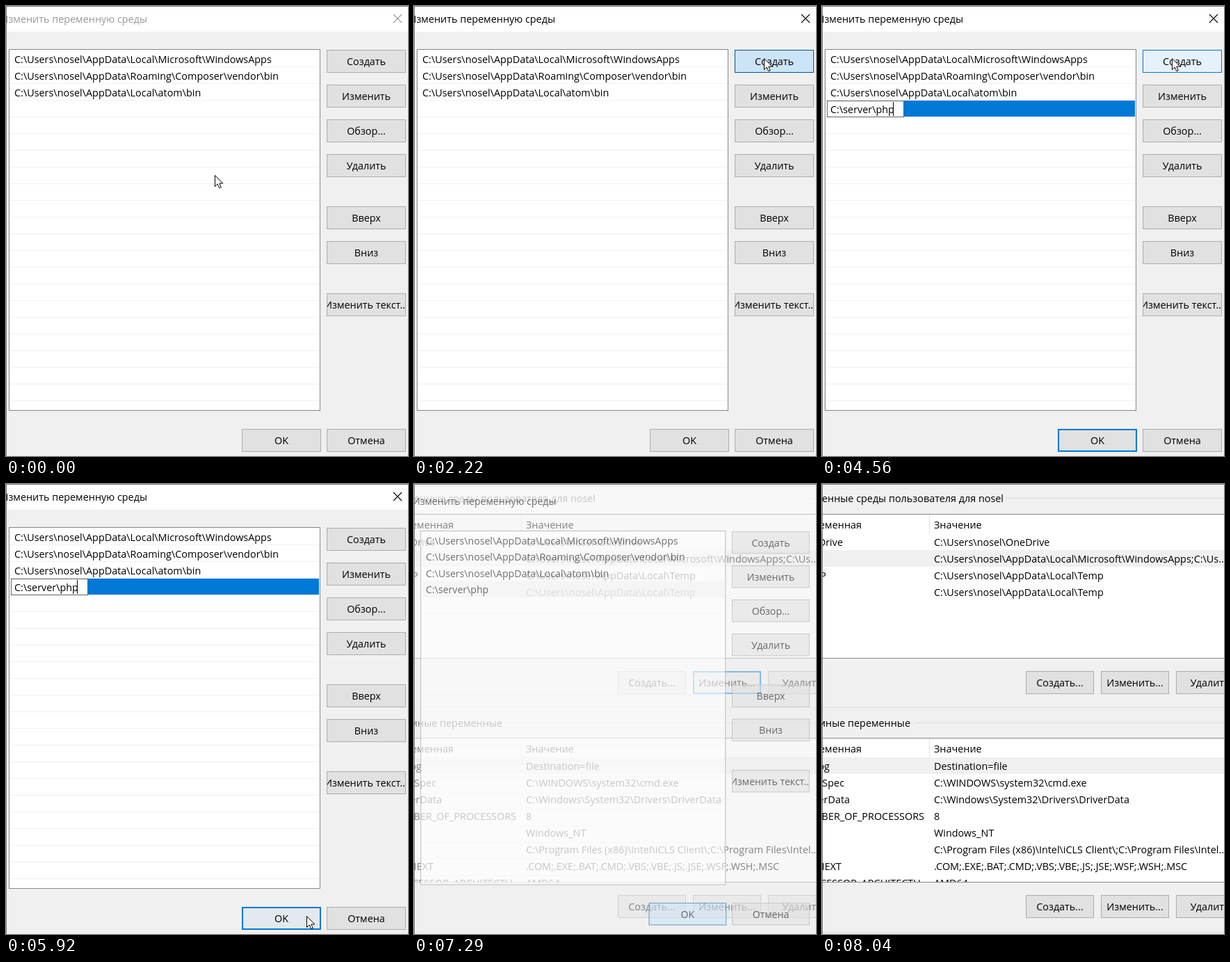
An HTML page with a canvas that plays this animation: 578 by 647 pixels, repeating every 8140 ms.

```html
<!DOCTYPE html>
<html lang="ru">
<head>
<meta charset="utf-8">
<style>
  html, body { margin: 0; width: 100%; height: 100%; overflow: hidden; background: #f0f0f0; }
  canvas { display: block; }
</style>
</head>
<body>
<canvas id="stage" width="578" height="647"></canvas>
<script>
const W = 578, H = 647, LOOP = 8140, STEP = 90;
const ctx = document.getElementById('stage').getContext('2d');
const HOME = 'C:\\Users\\nosel\\';
const PATHS = [
  HOME + 'AppData\\Local\\Microsoft\\WindowsApps',
  HOME + 'AppData\\Roaming\\Composer\\vendor\\bin',
  HOME + 'AppData\\Local\\atom\\bin'
];
const NEW_PATH = 'C:\\server\\php';
const BLUE = [0, 120, 215], GREY = [225, 225, 225], EDGE = [173, 173, 173], HOT = [229, 241, 251];
const CARET_OFF = [[2840, 3310], [4000, 4560], [5110, 5650], [6100, 6560]];
const USER_VARS = [
  ['OneDrive', 30, HOME + 'OneDrive'],
  ['', 0, PATHS[0] + ';C:\\Us...'],
  ['TEMP', 6, HOME + 'AppData\\Local\\Temp'],
  ['', 0, HOME + 'AppData\\Local\\Temp']
];
const SYSTEM_VARS = [
  ['asl.log', 11, 'Destination=file'],
  ['ComSpec', 32, 'C:\\WINDOWS\\system32\\cmd.exe'],
  ['DriverData', 40, 'C:\\Windows\\System32\\Drivers\\DriverData'],
  ['NUMBER_OF_PROCESSORS', 147, '8'],
  ['', 0, 'Windows_NT'],
  ['', 0, 'C:\\Program Files (x86)\\Intel\\iCLS Client\\;C:\\Program Files\\Intel...'],
  ['PATHEXT', 28, '.COM;.EXE;.BAT;.CMD;.VBS;.VBE;.JS;.JSE;.WSF;.WSH;.MSC'],
  ['PROCESSOR_ARCHITECTU...', 153, 'AMD64']
];

// Fraction of a move made of `count` equal steps, the first one at `start`
const progress = (t, start, count) =>
  Math.min(1, Math.max(0, (Math.floor((t - start) / STEP) + 1) / count));
const ease = p => p * p * (3 - 2 * p);
const lerp = (a, b, p) => a + (b - a) * p;
const mix = (a, b, p) => `rgb(${a.map((v, i) => Math.round(lerp(v, b[i], p)))})`;

function rect(x, y, w, h, color) {
  ctx.fillStyle = color;
  ctx.fillRect(x, y, w, h);
}

function frame(x, y, w, h, color, line = 1) {
  ctx.strokeStyle = color;
  ctx.lineWidth = line;
  ctx.strokeRect(x + line / 2, y + line / 2, w - line, h - line);
}

function text(s, x, y, align = 'left', color = '#000') {
  ctx.textAlign = align;
  ctx.fillStyle = color;
  ctx.fillText(s, x, y);
}

function button(label, x, y, w, { hot = 0, pressed = false, focus = false } = {}) {
  rect(x, y, w, 33, pressed ? '#cce4f7' : mix(GREY, HOT, hot));
  const edge = pressed ? '#005499' : mix(focus ? BLUE : EDGE, BLUE, hot);
  frame(x, y, w, 33, edge, focus && !pressed ? 2 : 1);
  ctx.save();
  ctx.beginPath();
  ctx.rect(x + 1, y + 1, w - 2, 31);
  ctx.clip();
  text(label, x + w / 2, y + 22, 'center');
  ctx.restore();
}

function closeCross(color) {
  ctx.strokeStyle = color;
  ctx.lineWidth = 1.1;
  ctx.beginPath();
  ctx.moveTo(557, 12); ctx.lineTo(569, 24);
  ctx.moveTo(569, 12); ctx.lineTo(557, 24);
  ctx.stroke();
}

function pathList(t) {
  rect(4, 62, 448, 520, '#fff');
  for (let y = 87; y < 580; y += 24) rect(5, y, 446, 1, '#f0f0f0');
  frame(4, 62, 448, 520, '#828790');
  PATHS.forEach((path, i) => text(path, 12, 82 + 24 * i));
  if (t >= 7200) {
    rect(8, 136, 442, 23, '#f0f0f0');
    text(NEW_PATH, 12, 154);
  } else if (t >= 2310) {
    const typed = t >= 3490, width = typed ? 111 : 22;
    rect(8, 136, 442, 23, '#0078d7');
    rect(7, 136, width, 24, '#fff');
    frame(7, 136, width, 24, '#646464');
    if (typed) text(NEW_PATH, 12, 154);
    if (!CARET_OFF.some(([a, b]) => t >= a && t < b)) rect(typed ? 102 : 13, 138, 1, 20, '#000');
  }
}

// The dialog reaches a little past the stage, which shows once it shrinks
function editDialog(t) {
  const titleColor = t < 2220 ? '#999' : '#000';
  rect(-20, -2, W + 26, H + 10, '#f0f0f0');
  rect(-20, -2, W + 26, 39, '#fff');
  text('Изменить переменную среды', 203, 24, 'right', titleColor);
  if (t < 7290) closeCross(titleColor);
  pathList(t);

  const createHot = progress(t, 1390, 4) - progress(t, 5020, 4);
  button('Создать', 461, 63, 114, { hot: createHot, pressed: t >= 2220 && t < 2310 });
  [['Изменить', 113], ['Обзор...', 163], ['Удалить', 213], ['Вверх', 288],
   ['Вниз', 338], ['Изменить текст...', 413], ['Отмена', 608]]
    .forEach(([label, y]) => button(label, 461, y, 114));
  button('OK', 339, 608, 114, { hot: progress(t, 5830, 4), focus: t >= 2310, pressed: t >= 7110 });
}

function variableTable(top, rows, selected, clear) {
  ctx.save();
  ctx.beginPath();
  ctx.rect(0, top, W, 207);
  ctx.clip();
  if (!clear) {
    rect(0, top, W, 207, '#fff');
    rect(0, top + 28 + 24 * selected, W, 24, '#f0f0f0');
  }
  rect(154, top + 1, 1, 28, '#e5e5e5');
  text('Переменная', 57, top + 21, 'right');
  text('Значение', 161, top + 21);
  rows.forEach(([name, right, value], i) => {
    const y = top + 46 + 24 * i;
    text(name, right, y, 'right');
    text(value, 161, y);
  });
  ctx.restore();
  rect(0, top, W, 1, '#828790');
  rect(0, top + 207, W, 1, '#828790');
}

function variablesWindow(t, clear = false) {
  if (!clear) rect(0, 0, W, H, '#f0f0f0');
  [[264, 20], [0, 321], [132, 343], [0, 644]].forEach(([x, y]) => rect(x, y, W - x, 1, '#dcdcdc'));
  text('Переменные среды пользователя для nosel', 261, 26, 'right');
  text('Системные переменные', 127, 349, 'right');
  variableTable(43, USER_VARS, 1, clear);
  variableTable(365, SYSTEM_VARS, 0, clear);
  for (const y of [269, 591]) {
    button('Создать...', 293, y, 98);
    button('Изменить...', 401, y, 98, { focus: y === 269 && t < 8040 });
    button('Удалить', 509, y, 98);
  }
}

function fadingDialog(t, scale, alpha) {
  ctx.save();
  ctx.translate(267, 314);
  ctx.scale(scale, scale);
  ctx.translate(-267, -314);
  ctx.globalAlpha = alpha;
  editDialog(t);
  ctx.restore();
}

function pointer(t) {
  const a = ease(progress(t, 1120, 4)), b = ease(progress(t, 4930, 11)), nudge = t >= 6930;
  const x = lerp(lerp(300, 503, a), 432, b) + (nudge ? 3 : 0);
  const y = lerp(lerp(243, 75, a), 621, b) + (nudge ? 4 : 0);
  ctx.save();
  ctx.translate(Math.round(x) + 0.5, Math.round(y) + 0.5);
  ctx.fillStyle = '#fff';
  ctx.strokeStyle = '#000';
  ctx.lineWidth = 1;
  const arrow = new Path2D('M0 0V16L3.7 12.5 6.3 18.2 8.8 17.2 6.3 11.5H11.3Z');
  ctx.fill(arrow);
  ctx.stroke(arrow);
  ctx.restore();
}

function draw(t) {
  ctx.font = '14.4px "Open Sans", "Noto Sans", sans-serif';
  if (t < 7290) {
    editDialog(t);
  } else {
    variablesWindow(t);
    if (t < 7380) {
      fadingDialog(t, 0.98, 0.55);
    } else if (t < 7470) {
      // Pale sheet left by the closing dialog
      rect(0, 11, 571, 630, '#fafafa');
      variablesWindow(t, true);
      fadingDialog(t, 0.959, 0.12);
    }
  }
  rect(0, 0, W, 1, '#7a7a7a');
  rect(0, 0, 1, H, '#7a7a7a');
  if (t < 7290) pointer(t);
}

const began = performance.now();
function tick() {
  draw((performance.now() - began) % LOOP);
  requestAnimationFrame(tick);
}
tick();
</script>
</body>
</html>
```
